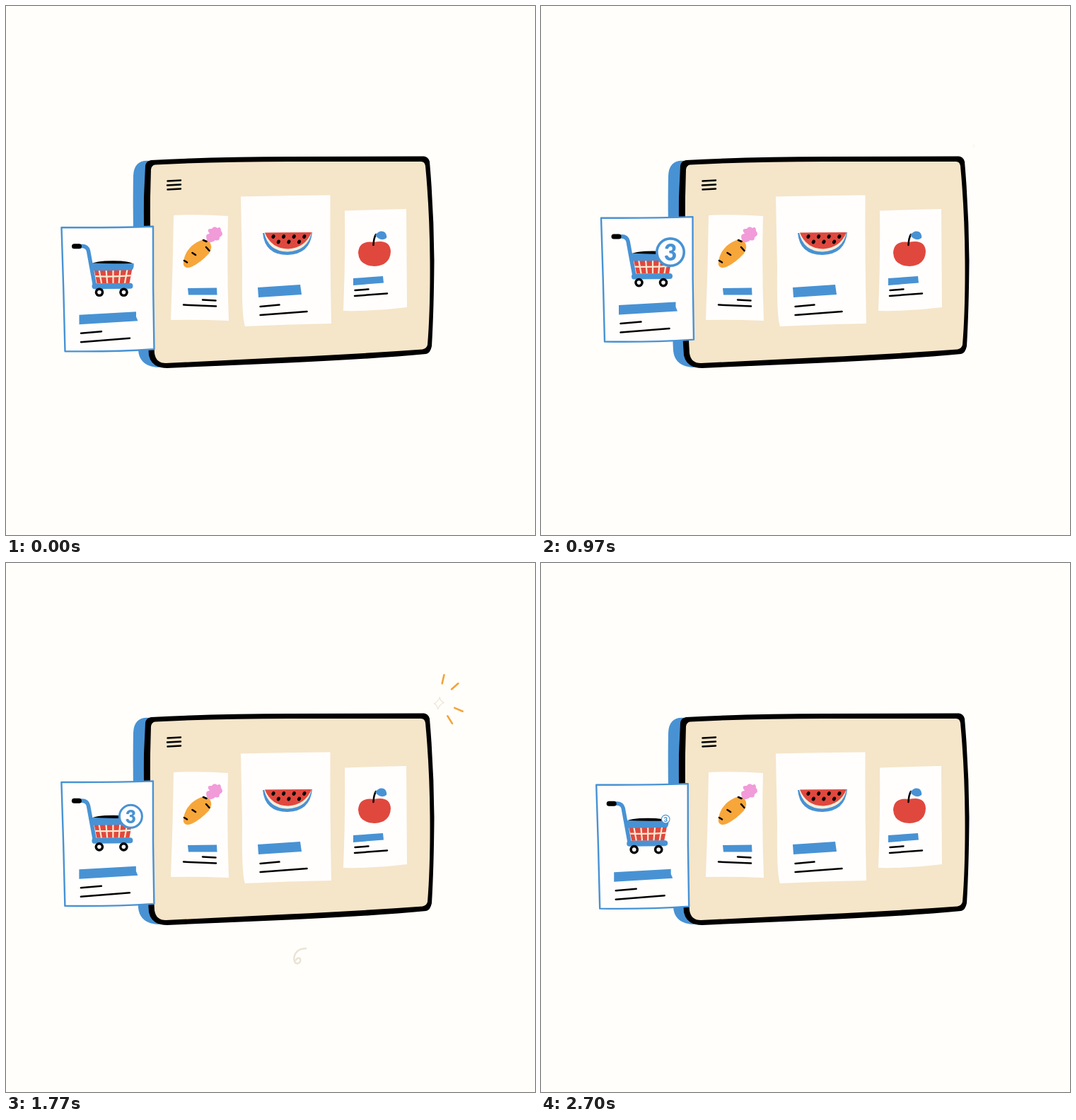
Recreate the animation shown at these times as an HTML page. Size 748 by 748 pixels, loop 2.73 s.

```html
<!DOCTYPE html>
<html lang="en">
<head>
<meta charset="utf-8">
<title>Grocery cart</title>
<style>
  html, body { margin: 0; width: 100%; height: 100%; overflow: hidden; background: #fffefa; }
  svg { display: block; width: 100%; height: 100%; }
  .blue { fill: #4892d4; }
  .red { fill: #e0483e; }
  .cream { fill: #f5e5c9; }
  .paper { fill: #fffefd; }
  .line, .tube, .grid, .pale, .ray { fill: none; stroke-linecap: round; stroke-linejoin: round; }
  .line { stroke: #000; stroke-width: 2.5; }
  .tube { stroke: #4892d4; }
  .grid { stroke: #fbe9cf; stroke-width: 2.2; stroke-linecap: butt; }
  .pale { stroke: #ebe3d6; }
  .ray { stroke: #f2a33a; stroke-width: 2.6; }
  .product { transform-box: fill-box; transform-origin: center; }
  text { font: 900 26px Lato, sans-serif; text-anchor: middle; }
</style>
</head>
<body>
<svg viewBox="0 0 748 748">
  <g id="tablet">
    <path class="blue" d="M203 219Q181 217 180 240Q179 300 181 360L187 487Q189 510 216 511L230 505L215 230Z"/>
    <path d="M205 218Q300 213 400 213L591 212.500Q597 213 599 220Q605 290 605.500 360Q605 430 602 481Q600 491 594 492Q520 499 400 504.500L228 512Q206 512 202 494Q194 370 195 270L197 226Q198 219 205 218Z"/>
    <path class="cream" d="M211 224.500Q300 220 400 220L587 220Q592 220 593 226Q599 290 599.500 360Q600 430 596 479Q595 484 589 485.500Q500 492 400 496.500L226 505Q212 505 210 491Q203 370 204 270L205 231Q206 225 211 224.500Z"/>
    <path class="line" d="M228.500 247.500l18.500-1M228 253.500l19-1M228.500 259.500l18.500-1"/>
  </g>

  <g class="product">
    <path class="paper" d="M237 296Q275 294 314 297Q312 370 315 445Q270 443 233 444Q236 370 237 296Z"/>
    <path fill="#f19bd9" d="M285 333Q280 322 288 322Q282 314 291 315Q294 310 299 314Q304 311 304 318Q309 323 302 327Q302 333 296 331Q291 336 285 333Z"/>
    <path fill="#f7a63a" d="M272 333Q281 328 288 334Q293 341 287 350Q275 363 262 369Q253 372 251 366Q250 358 256 347Q263 337 272 333Z"/>
    <path class="line" d="M279 331l4.500 2M283 341l4.500 5M263.500 349l4.500 3M252 360l4 2.500"/>
    <path class="blue" d="M257 399l41-.5l.5 10l-40.500 0Z"/>
    <path class="line" d="M278 415.500l18.500 1M251 422.500l46 2"/>
  </g>

  <g class="product">
    <path class="paper" d="M332 269.500Q395 268 458.500 267.500Q458 360 460 449Q400 450 338 453Q333 440 334 370Z"/>
    <path class="blue" d="M363 321Q366 352 398 352Q430 351 433 320Z"/>
    <path fill="#fbeedb" d="M365 320.500Q371 347 398 347.500Q427 346 432 320Z"/>
    <path class="red" d="M366 320.500Q375 343 399 343.500Q423 342 432 320Z"/>
    <g id="seeds"></g>
    <path class="blue" d="M356 398l60-4l2 14l-61 4Z"/>
    <path class="line" d="M359.500 425l27-2.500M359.500 437l66-5"/>
  </g>

  <g class="product">
    <path class="paper" d="M479 289.500Q520 288 566 287L567 426Q520 432 477 431Q480 360 479 289.500Z"/>
    <path class="red" d="M520 334Q543 329 544 347Q543 367 521 368Q499 367 498 349Q499 331 520 334Z"/>
    <path class="line" d="M519.500 338Q520 328 523 323"/>
    <path class="blue" d="M522 324Q528 316 535 319.500Q539 323 538 328Q530 334 522 324Z"/>
    <path class="blue" d="M491 385l42-3l1 9.500l-43 3.500Z"/>
    <path class="line" d="M493.500 402l19-1.500M493 410l46-3.500"/>
  </g>

  <g id="cart">
    <path class="paper" stroke="#4892d4" stroke-width="2.400" stroke-linejoin="round" d="M79 314Q150 314.500 208.500 312.500Q208 400 210 486Q150 490 84 489Q82 400 79 314Z"/>
    <path class="tube" stroke-width="5.500" d="M105 340.500Q115 339 117 347L126 396"/>
    <path class="line" style="stroke-width:7" d="M97 340.500h7"/>
    <path d="M121 366Q126 361 152 361Q176 361 181 366Z"/>
    <path class="red" d="M125 373L179 372L175 393L129 393Z"/>
    <path class="grid" d="M127 383Q152 384 178 382"/>
    <g id="bars"></g>
    <path class="blue" d="M121 364Q150 366 181 364.500Q182 370 179 374Q150 375 123 375Z"/>
    <path class="tube" stroke-width="8" d="M126 397L176 396.500"/>
    <g id="wheels"></g>
    <path class="blue" d="M104 437.500l80.500-4.500v7l2.500 6l-83 5Z"/>
    <path class="line" d="M106.500 463.500l29-2.500M106.500 476l69-5.500"/>
    <g id="badge">
      <circle class="paper" r="16" stroke="#4892d4" stroke-width="3"/>
      <text class="blue" y="9.500">3</text>
    </g>
  </g>

  <path id="star" class="pale" stroke-width="1.600" d="M2 -12Q3 -3 11 -1Q2 3 -2 13Q-3 4 -10 1Q-2 -2 2 -12Z"/>
  <g id="rays"></g>
  <path id="swirl" class="pale" stroke-width="2.500" pathLength="100" d="M424 582C412 582 404 568 411 560C416 555 419 564 413 566C404 568 404 545 424 545"/>
</svg>
<script>
const LOOP = 2730, SPARKLE = 1230;
const $ = id => document.getElementById(id);
const progress = (t, start, end) => Math.min(1, Math.max(0, (t - start) / (end - start)));
const wave = (t, peak) => Math.cos((t - peak) / LOOP * 2 * Math.PI);
const outQuad = u => 1 - (1 - u) ** 2;
const smooth = u => u * u * (3 - 2 * u);
const outBack = (u, pull) => 1 + (pull + 1) * (u - 1) ** 3 + pull * (u - 1) ** 2;

function add(parent, tag, attrs) {
  const node = document.createElementNS("http://www.w3.org/2000/svg", tag);
  for (const key in attrs) node.setAttribute(key, attrs[key]);
  return $(parent).appendChild(node);
}

function show(node, visible) {
  node.style.display = visible ? "" : "none";
}

function place(id, x, y, scale = 1) {
  $(id).setAttribute("transform", `translate(${x} ${y}) scale(${scale})`);
  show($(id), scale > 0.01);
}

for (let i = 0; i < 7; i++) {
  const x = 378 + 7.3 * i, y = i % 2 ? 333.5 : 326;
  add("seeds", "ellipse", { cx: x, cy: y, rx: 2.4, ry: 3, transform: `rotate(25 ${x} ${y})` });
}
for (let i = -2; i <= 2; i++)
  add("bars", "path", { class: "grid", d: `M${152 + 10 * i} 373L${152 + 8.2 * i} 393` });
for (const x of [132.5, 167]) {
  add("wheels", "circle", { cx: x, cy: 405.5, r: 6.3 });
  add("wheels", "circle", { cx: x, cy: 405.5, r: 2.8, class: "paper" });
}

const products = document.querySelectorAll(".product");
const rays = [-77, -41, 23, 58].map(angle =>
  add("rays", "path", { class: "ray", transform: `translate(611 195) rotate(${angle})` }));

function drawCards(t) {
  place("cart", 1.5 + 4.6 * wave(t, 880), -6.1 - 8.3 * wave(t, 985));
  const pop = t > 820 ? outBack(progress(t, 820, 1120), 2.6) : 0;
  place("badge", 177, 362.5, pop * progress(t, LOOP, LOOP - 80));

  // Each product swells once, one after the other.
  products.forEach((card, i) => {
    const start = 170 + 120 * i;
    const swell = Math.sin(Math.PI * progress(t, start, start + 420)) ** 2;
    card.style.transform = `scale(${1 + 0.145 * swell})`;
  });
}

function drawSparkles(t) {
  place("star", 612, 198, progress(t, 0, 90) * Math.sqrt(progress(t, 1000, 0)));

  const head = 12 + 28 * outQuad(progress(t, 250, 660));
  const tail = 12 + 28 * smooth(progress(t, 430, 660));
  for (const ray of rays) {
    ray.setAttribute("d", `M${tail} 0H${head}`);
    show(ray, head - tail > 0.5);
  }

  const from = 100 * progress(t, 350, 615) ** 3;
  const length = 100 * progress(t, 150, 400) - from;
  $("swirl").setAttribute("stroke-dasharray", `${length} 300`);
  $("swirl").setAttribute("stroke-dashoffset", -from);
  show($("swirl"), length > 0.5);
}

const begin = performance.now();
function tick() {
  const t = (performance.now() - begin) % LOOP;
  drawCards(t);
  drawSparkles(t < 2 * SPARKLE ? t % SPARKLE : 0);
  requestAnimationFrame(tick);
}
tick();
</script>
</body>
</html>
```
